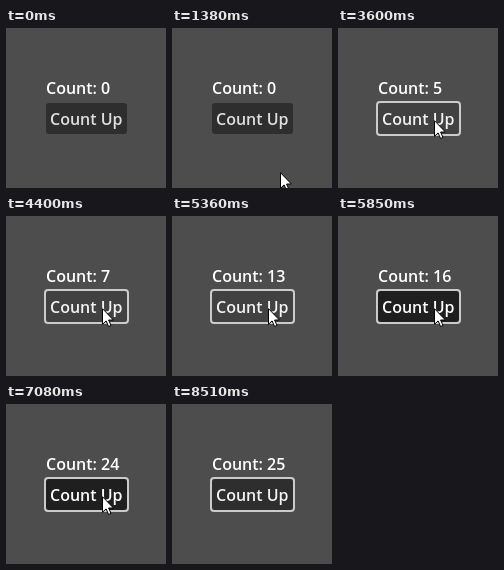
These frames come from a looping animation (160x160 px, 9640 ms). An HTML page:

```html
<!DOCTYPE html>
<html lang="en">
<head>
<meta charset="utf-8">
<title>Counter</title>
<style>
  html, body { margin: 0; width: 100%; height: 100%; overflow: hidden; background: #4d4d4d; }
  svg { display: block; width: 100vw; height: 100vh; }
  text { font: 600 16px "Open Sans", "Noto Sans", sans-serif; white-space: pre; }
  #focus { fill: none; stroke: #cbcbcb; stroke-width: 2; }
  #cursor { fill: #fff; stroke: #000; stroke-width: 1; }
</style>
</head>
<body>
<svg viewBox="0 0 160 160">
  <text id="label" x="40" y="66" fill="#fff">Count: 0</text>
  <rect id="button" x="40" y="75" width="81" height="31" rx="3"/>
  <rect id="focus" x="39" y="74" width="83" height="33" rx="3"/>
  <text id="caption" x="44" y="97">Count Up</text>
  <path id="cursor" d="M.5 .7V16.3L4.1 12.9 6.6 18.5 9 17.4 6.6 12H11.4Z"/>
</svg>
<script>
const LOOP = 9640, FRAME = 68;
const ENTER = 1380, LEAVE = 8090, STEP = 70;
const $ = id => document.getElementById(id);
const label = $('label'), button = $('button'), focusRing = $('focus');
const caption = $('caption'), cursor = $('cursor');

// A run of clicks: each is held for one frame, `gap` frames apart on average.
const burst = (start, count, gap) =>
  Array.from({ length: count }, (_, i) => start + Math.round(i * gap) * FRAME);

const presses = [
  burst(1910, 3, 5),
  burst(2990, 1, 0),
  burst(3515, 3, 6),
  burst(4470, 6, 2.4),
  burst(5430, 7, 1.9),
  burst(6340, 2, 2),
  burst(6740, 3, 2.4)
].flat();

const looks = {
  normal: ['#2e2e2e', '#dfdfdf'],
  focused: ['#2e2e2e', '#f2f2f2'],
  hover: ['#414141', '#f2f2f2'],
  pressed: ['#1f1f1f', '#ffffff']
};

// Progress from 0 to 1 in n hard steps.
const stepped = (t, start, n) =>
  Math.min(1, Math.max(0, Math.floor((t - start) / STEP) / n));

function pointer(t) {
  if (t < ENTER) return [108, 170];
  if (t < LEAVE) {
    const rest = (1 - stepped(t, ENTER, 4)) ** 2;
    return [Math.round(96 + 12 * rest), Math.round(92 + 52 * rest)];
  }
  const away = stepped(t, LEAVE - STEP, 7) ** 2;
  return [Math.round(96 + 23 * away), Math.round(92 + 78 * away)];
}

function draw(t) {
  const count = presses.filter(p => t >= p + FRAME).length;
  const pressed = presses.some(p => t >= p && t < p + FRAME);
  const focused = t >= presses[0];
  const [x, y] = pointer(t);
  const over = x >= 40 && x < 121 && y >= 75 && y < 106;
  const state = pressed ? 'pressed' : over ? 'hover' : focused ? 'focused' : 'normal';
  const [back, ink] = looks[state];

  label.textContent = 'Count: ' + count;
  button.setAttribute('fill', back);
  caption.setAttribute('fill', ink);
  focusRing.setAttribute('visibility', focused ? 'visible' : 'hidden');
  cursor.setAttribute('transform', `translate(${x} ${y})`);
}

const start = performance.now();
function tick() {
  draw((performance.now() - start) % LOOP);
  requestAnimationFrame(tick);
}
draw(0);
requestAnimationFrame(tick);
</script>
</body>
</html>
```
